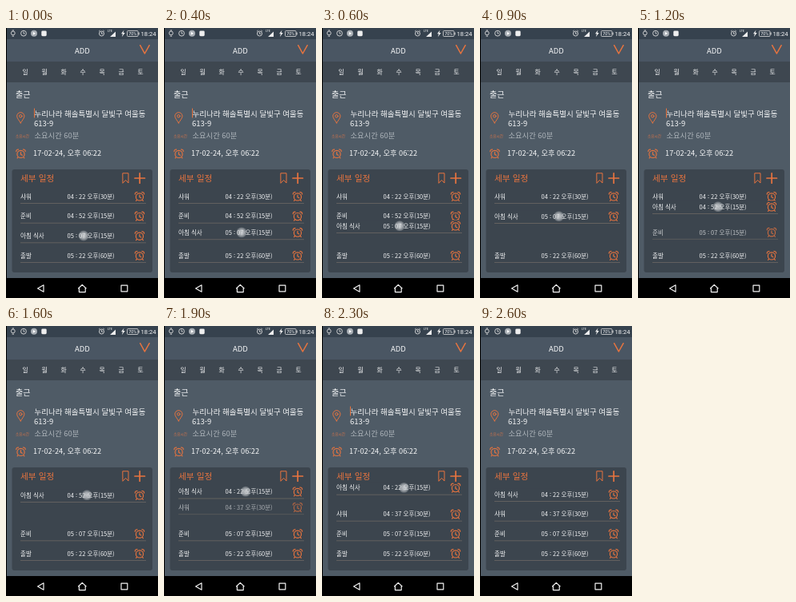
These frames come from a looping animation (190 px wide and 338 px high, 2700 ms). An HTML page:

```html
<!DOCTYPE html>
<html lang="ko">
<head>
<meta charset="utf-8">
<style>
html, body { margin: 0; width: 100%; height: 100%; overflow: hidden; background: #000; }
svg { display: block; width: 190px; height: 338px; }
text { font-family: "Noto Sans CJK KR", "Noto Sans CJK", "Noto Sans", sans-serif; fill: #f4f5f6; }
.roboto { font-family: Roboto, sans-serif; }
.line { fill: none; stroke: #e8743f; stroke-linecap: round; stroke-linejoin: round; }
.accent { fill: #e8743f; }
.soft { fill: #d5744a; }
.dim { fill: #aeb5bb; }
</style>
</head>
<body>
<svg viewBox="0 0 190 338">
  <defs>
    <radialGradient id="glow">
      <stop offset="0" stop-color="#e4e6e8" stop-opacity=".8"/>
      <stop offset=".55" stop-color="#d0d3d6" stop-opacity=".7"/>
      <stop offset="1" stop-color="#b4b9bd" stop-opacity=".3"/>
    </radialGradient>
    <g id="alarm" class="line" stroke-width="1.15">
      <circle r="4.6" cy=".4"/>
      <path d="M0-2V.8L1.9 1.8M-3.3 4-4.4 5.4M3.3 4 4.4 5.4M-5.7-2.9A2.2 2.2 0 0 1-2.9-5.4M5.7-2.9A2.2 2.2 0 0 0 2.9-5.4"/>
    </g>
  </defs>

  <rect width="190" height="338"/>
  <rect x="1" width="189" height="14" fill="#36424e"/>
  <rect x="1" y="14" width="189" height="299" fill="#4f5b66"/>
  <rect x="1" y="14" width="189" height="28" fill="#4a5663"/>
  <rect x="1" y="42" width="189" height="26" fill="#3e4750"/>
  <rect x="7.5" y="177" width="175.5" height="129" rx="3" fill="#3c454e"/>

  <g fill="none" stroke="#ddd" stroke-width=".9">
    <circle cx="8.8" cy="6.4" r="2.4"/>
    <path d="M7.6 3H10M7.6 10.2H10"/>
    <circle cx="22" cy="6.7" r="3.4"/>
    <path d="M22 4.6V7H23.6"/>
    <circle cx="119.5" cy="7" r="3"/>
    <path d="M119.5 5.2V7.2H121M116.1 4.2 117.5 3M122.9 4.2 121.5 3"/>
  </g>
  <circle cx="35" cy="6.7" r="4" fill="#a9afb5"/>
  <path d="M33.8 4.7V8.7L37 6.7Z" fill="#fff"/>
  <rect x="44.3" y="3.6" width="6.4" height="6.6" rx="1.4" fill="#eee"/>
  <path d="M130 11H137V4.5ZM147.5 2.5 144 7.3H146L144.8 11.3 148.8 6H146.6Z" fill="#eee"/>
  <rect x="151.5" y="3.5" width="13.5" height="7" rx="1" fill="none" stroke="#ddd" stroke-width=".8"/>
  <path d="M165.4 5.5H166.6V8.5H165.4Z" fill="#ddd"/>

  <path class="line" stroke-width="1.5" d="M167.7 21.7 173.4 32 179.2 21.7"/>
  <path class="line" stroke-width="1" d="M18.3 118.9C16.3 115.4 13.7 113 13.7 110.3A4.6 4.6 0 0 1 22.9 110.3C22.9 113 20.3 115.4 18.3 118.9Z"/>
  <circle class="line" cx="18.3" cy="110.3" r="1.7"/>
  <use href="#alarm" x="18.5" y="157.5"/>
  <path class="line" stroke-width="1" d="M146.2 181.8H153V194L149.6 190.4 146.2 194Z"/>
  <path class="line" stroke-width="1.7" d="M161 188H173.5M167.2 181.8V194.2"/>
  <path id="caret" class="line" stroke-width="1" d="M35.5 101V112"/>

  <g fill="none" stroke="#f2f2f2" stroke-width="1.2" stroke-linejoin="round">
    <path d="M47 321.8V330.2L39.6 326Z"/>
    <path d="M90.2 326.2 95.3 321.4 100.4 326.2M91.4 325.4V330.6H99.2V325.4"/>
    <rect x="144" y="322.2" width="7.8" height="7.6"/>
  </g>

  <g id="labels"></g>
  <g id="rows"></g>
  <circle id="touch" r="6.4" fill="url(#glow)"/>
</svg>
<script>
const $ = id => document.getElementById(id);
const LOOP = 2700, STEP = 100, MOVE = 250;

// y is the vertical centre of the line
const label = (s, x, y, size, attrs = '') =>
  `<text x="${x}" y="${y + size * 0.36}" font-size="${size}" ${attrs}>${s}</text>`;
const mid = 'text-anchor="middle"';
const medium = 'font-weight="500"';

$('labels').innerHTML = [
  label('LTE', 127, 3.8, 3.8, 'class="roboto"'),
  label('70%', 158.2, 7, 5.4, `class="roboto" ${mid}`),
  label('18:24', 168.5, 7, 7.7, 'class="roboto"'),
  label('ADD', 95.5, 28.5, 9.5, mid),
  ...[...'일월화수목금토'].map((d, i) => label(d, 24 + i * 24, 54.7, 7.8, `${mid} ${medium}`)),
  label('출근', 12, 83, 10),
  label('누리나라 해솔특별시 달빛구 여울동', 35.5, 108, 9.5),
  label('613-9', 35, 119.5, 9.5),
  label('소요시간', 12, 135.5, 4.6, 'class="soft"'),
  label('소요시간 60분', 35.5, 135, 9.3, 'class="dim"'),
  label('17-02-24, 오후 06:22', 34, 157, 9.25, medium),
  label('세부 일정', 18, 188.3, 10.7, 'class="accent"')
].join('');

const slots = [211, 235.7, 260.3, 285];
const SWAP1 = 1020, SWAP2 = 1750;

const rows = [
  { name: '샤워', min: 30, times: ['04 : 22', '04 : 37'], from: 0, swap: SWAP2 },
  { name: '준비', min: 15, times: ['04 : 52', '05 : 07'], from: 1, swap: SWAP1 },
  { name: '출발', min: 60, times: ['05 : 22'], from: 3 },
  { name: '아침 식사', min: 15, times: ['05 : 07', '04 : 52', '04 : 22'], drag: true }
];

for (const row of rows) {
  const g = document.createElementNS('http://www.w3.org/2000/svg', 'g');
  g.innerHTML =
    (row.drag ? '<rect x="16" y="-7.5" width="160" height="16" fill="#3c454e"/>' : '') +
    '<path d="M18 8.5H175" stroke="#6d6864" stroke-width=".8"/>' +
    '<use href="#alarm" x="167" y="0"/>' +
    label(row.name, 18, 0, 7.5, medium) +
    row.times.map(s => label(`${s} 오후(${row.min}분)`, 76.5, 0, 7.5, `class="time" ${medium}`)).join('');
  row.el = g;
  row.labels = [...g.querySelectorAll('.time')];
  $('rows').append(g);
}

// [ms, row y]
const dragPath = [[0, 260.3], [300, 260.3], [600, 248], [1200, 224], [1600, 212],
  [1900, 207.5], [2300, 202.7], [2400, 202.7], [2500, 208], [2600, 211], [2700, 211]];
const touchX = [[0, 97], [600, 97], [1200, 100], [1900, 102], [2700, 103]];

function at(path, t) {
  const i = path.findIndex(k => k[0] > t);
  const [t0, a] = path[i - 1], [t1, b] = path[i];
  return a + (b - a) * (t - t0) / (t1 - t0);
}

function progress(t, start) {
  const p = Math.min(1, Math.max(0, (t - start) / MOVE));
  return (1 - Math.cos(p * Math.PI)) / 2;
}

function draw(t) {
  const dragY = at(dragPath, t);
  for (const row of rows) {
    let y, shown;
    if (row.drag) {
      y = dragY;
      const n = (t >= SWAP1) + (t >= SWAP2);
      shown = row.times.map((_, i) => +(i === n));
    } else if (row.swap) {
      const p = progress(t, row.swap);
      y = slots[row.from] + (slots[row.from + 1] - slots[row.from]) * p;
      shown = [1 - p, p];
      row.el.setAttribute('opacity', 1 - 1.4 * p * (1 - p));
    } else {
      y = slots[row.from];
      shown = [1];
    }
    row.el.setAttribute('transform', `translate(0 ${y})`);
    row.labels.forEach((el, i) => el.setAttribute('opacity', shown[i]));
  }
  $('touch').setAttribute('transform', `translate(${at(touchX, t)} ${dragY - 0.3})`);
  $('touch').setAttribute('opacity', t < 2400 ? 1 : 0);
  $('caret').setAttribute('opacity', t % 1000 < 500 ? 1 : 0);
}

const start = performance.now();
function tick() {
  const t = (performance.now() - start) % LOOP;
  draw(Math.floor(t / STEP) * STEP);
  requestAnimationFrame(tick);
}
tick();
</script>
</body>
</html>
```
